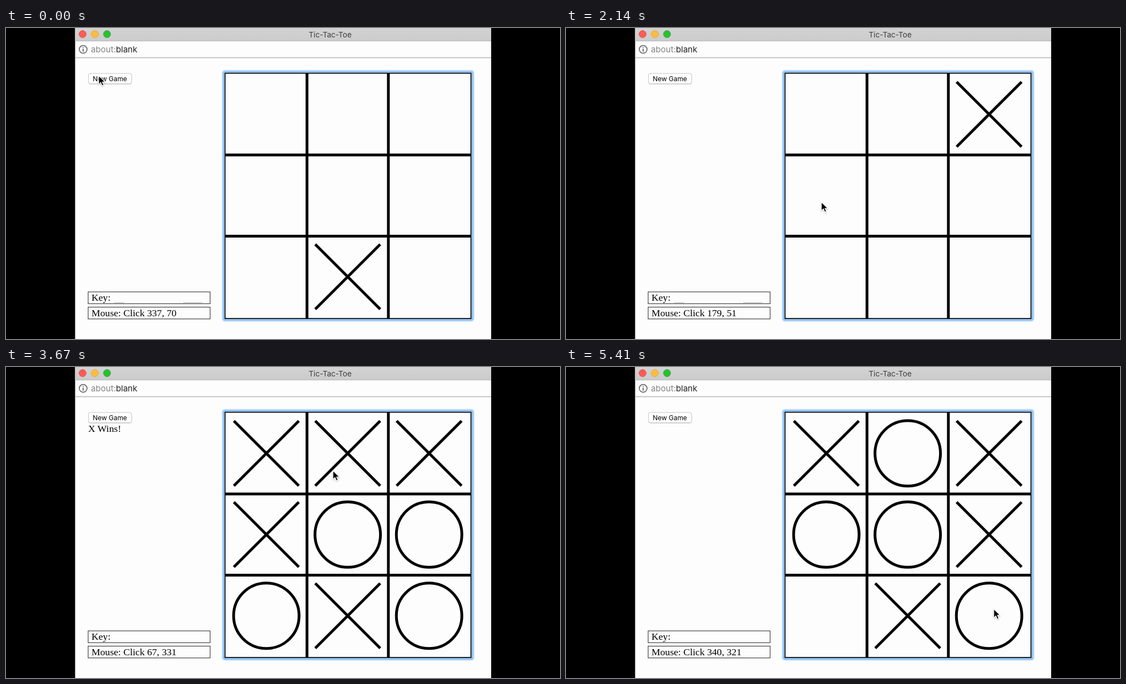
These frames come from a looping animation (998x561 px, 5.45 s). An HTML page:

```html
<!DOCTYPE html>
<html lang="en">
<head>
<meta charset="utf-8">
<title>Tic-Tac-Toe</title>
<style>
  html, body { margin: 0; width: 100%; height: 100%; overflow: hidden; background: #000; }
  svg { display: block; }
  .ui { font-family: Inter, Roboto, sans-serif; }
  .serif { font: 17.68px "Liberation Serif", "Times New Roman", serif; white-space: pre; }
  .ink { fill: none; stroke: #000; stroke-width: 5; }
  .box { fill: #fdfdfd; stroke: #333; stroke-width: 1.1; }
</style>
</head>
<body>
<svg width="998" height="561" viewBox="0 0 998 561">
  <defs>
    <linearGradient id="bar" x2="0" y2="1">
      <stop offset="0" stop-color="#d3d3d3"/>
      <stop offset="1" stop-color="#cbcbcb"/>
    </linearGradient>
    <filter id="soft" x="-5%" y="-5%" width="110%" height="110%"><feGaussianBlur stdDeviation=".8"/></filter>
    <filter id="shade" x="-50%" y="-50%" width="200%" height="200%">
      <feDropShadow dx="0" dy="1" stdDeviation="1" flood-opacity=".35"/>
    </filter>
  </defs>

  <!-- window -->
  <rect x="124.5" width="749.5" height="561" fill="#fdfdfd"/>
  <rect x="124.5" width="749.5" height="23.5" fill="url(#bar)"/>
  <path d="M124.5 23.5H874" stroke="#b9b9b9"/>
  <path d="M124.5 53.5H874" stroke="#b4b4b8" stroke-width="1.4"/>
  <g stroke-width=".8">
    <circle cx="138" cy="11" r="6.4" fill="#fc5b57" stroke="#df4744"/>
    <circle cx="160" cy="11" r="6.4" fill="#fdbc40" stroke="#de9f34"/>
    <circle cx="182" cy="11" r="6.4" fill="#28c131" stroke="#1fa52a"/>
  </g>
  <text class="ui" x="584" y="16.5" text-anchor="middle" font-size="13.6" fill="#3d3d3d">Tic-Tac-Toe</text>
  <g fill="none" stroke="#5c5c5c" stroke-width="1.5">
    <circle cx="139" cy="38.6" r="7"/>
    <path d="M139 37.4V42.6M139 34.4V36" stroke-width="1.8"/>
  </g>
  <text class="ui" x="153" y="44" font-size="15.1" fill="#858585">about:<tspan fill="#222">blank</tspan></text>

  <!-- side panel -->
  <rect x="148.5" y="82.8" width="78" height="18.8" rx="4" fill="#aaa" opacity=".7"/>
  <rect x="148.5" y="82" width="78" height="18.6" rx="4" fill="#fff" stroke="#c4c4c4"/>
  <text class="ui" x="187.2" y="95.8" text-anchor="middle" font-size="11.9">New Game</text>
  <text id="result" class="serif" x="148" y="117"></text>
  <rect class="box" x="148" y="476" width="219.7" height="21.3"/>
  <rect class="box" x="148" y="503.5" width="219.7" height="21.3"/>
  <text class="serif" x="154" y="492">Key:</text>
  <path id="dashes" d="M195 495.7H212.5M319 495.7H354" stroke="#aaa"/>
  <text id="mouse" class="serif" x="154" y="519.5"></text>

  <!-- board -->
  <rect x="392" y="79" width="448.5" height="447.5" rx="2" fill="none" stroke="#86bdf3" stroke-width="4.4" filter="url(#soft)"/>
  <rect x="394.6" y="81.6" width="443" height="442.4" fill="#fdfdfd" stroke="#000" stroke-width="1.7"/>
  <path class="ink" d="M542.2 82V524M688.8 82V524M395 229H837M395 375.6H837"/>
  <g id="marks"></g>

  <path id="cursor" d="M0 0V15.6L3.7 12.2L6.2 18L9 16.8L6.5 11.2H11.4Z" fill="#000" stroke="#fff" stroke-width="1.1" filter="url(#shade)"/>
</svg>
<script>
const LOOP = 5450, REPLY = 35, DASH_END = 3440;
const $ = id => document.getElementById(id);

// Each move: time, click x, click y on a 400-unit board, answering X cell.
const games = [
  { start: 0, first: 7, result: "Tie Game!", moves: [
    [310, 192, 205, 8], [650, 33, 342, 2], [970, 341, 197, 3], [1310, 179, 51, 0]] },
  { start: 1930, first: 2, result: "X Wins!", moves: [
    [2330, 192, 205, 7], [2880, 340, 191, 3], [3190, 334, 324, 0], [3450, 67, 331, 1]] },
  { start: 4390, first: 2, result: "", moves: [
    [4670, 192, 200, 0], [4890, 193, 66, 7], [5130, 62, 194, 5], [5395, 340, 321, null]] }
];

// Pointer stops between clicks: time, x, y on the stage.
const stops = [
  [0, 167, 86], [60, 167, 86], [870, 768, 361],
  [1480, 593, 138], [1840, 190, 92], [1980, 190, 92], [2140, 460, 314],
  [2480, 607, 309], [3040, 756, 319], [3670, 589, 187],
  [4160, 193, 91], [4460, 193, 91], [5450, 771, 436]
];
const toStage = ([t, x, y]) => [t, 395 + x * 1.105, 82 + y * 1.105];
const path = stops.concat(games.flatMap(g => g.moves.flatMap(m => {
  const [t, x, y] = toStage(m);
  return [[t - 15, x, y], [t + 25, x, y]];
}))).sort((a, b) => a[0] - b[0]);

function pointerAt(t) {
  const i = Math.max(1, path.findIndex(p => p[0] > t));
  const [a, b] = [path[i - 1], path[i]];
  const u = (t - a[0]) / (b[0] - a[0]);
  const e = u * u * (3 - 2 * u);
  return [a[1] + (b[1] - a[1]) * e, a[2] + (b[2] - a[2]) * e];
}

function markSvg(cell, kind) {
  const x = 469 + cell % 3 * 146.6, y = 155.7 + Math.floor(cell / 3) * 146.5, r = 58.5;
  return kind === "O"
    ? `<circle class="ink" cx="${x}" cy="${y}" r="59"/>`
    : `<path class="ink" d="M${x - r} ${y - r}l${2 * r} ${2 * r}M${x + r} ${y - r}l${-2 * r} ${2 * r}"/>`;
}

function stateAt(t) {
  const game = games.filter(g => g.start <= t).pop();
  const marks = [[game.first, "X"]];
  for (const [at, x, y, answer] of game.moves) {
    if (t >= at) marks.push([Math.floor(x / 133.4) + 3 * Math.floor(y / 133.4), "O"]);
    if (t >= at + REPLY && answer !== null) marks.push([answer, "X"]);
  }
  const click = games.flatMap(g => g.moves).filter(m => m[0] <= t).pop() || [0, 337, 70];
  return {
    marks: marks.map(m => markSvg(...m)).join(""),
    mouse: `Mouse: Click ${click[1]}, ${click[2]}`,
    result: marks.length === 9 ? game.result : ""
  };
}

let shown = "";
function draw(t) {
  const state = stateAt(t), key = JSON.stringify(state);
  if (key !== shown) {
    $("marks").innerHTML = state.marks;
    $("mouse").textContent = state.mouse;
    $("result").textContent = state.result;
    shown = key;
  }
  $("dashes").style.display = t < DASH_END ? "" : "none";
  $("cursor").setAttribute("transform", `translate(${pointerAt(t).join(" ")})`);
}

const begin = performance.now();
function tick() {
  draw((performance.now() - begin) % LOOP);
  requestAnimationFrame(tick);
}
tick();
</script>
</body>
</html>
```
